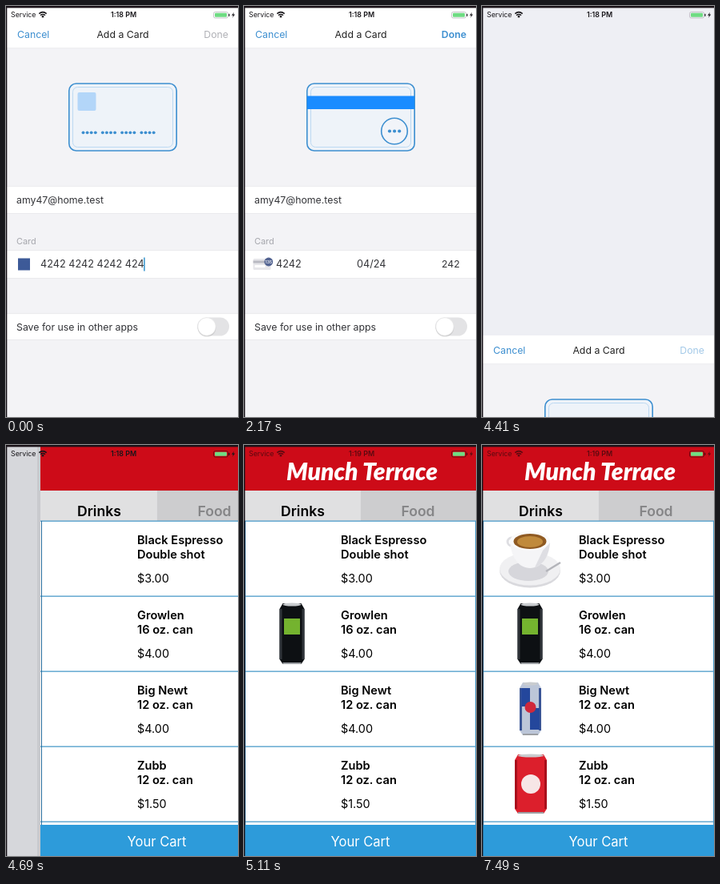
These frames come from a looping animation (290x514 px, 7560 ms). An HTML page:

```html
<!DOCTYPE html>
<html lang="en">
<head>
<meta charset="utf-8">
<title>Card form and menu</title>
<style>
  html, body { margin: 0; width: 100%; height: 100%; overflow: hidden; background: #111; }
  svg { display: block; width: 100vw; height: 100vh; font-family: Inter, "Open Sans", sans-serif; font-size: 12.3px; }
  .bold { font-weight: 600; }
  .digits { font-size: 12.7px; white-space: pre; }
  .title { font: italic 900 30px Lato, cursive; fill: #fff; }
</style>
</head>
<body>
<svg id="stage" viewBox="0 0 290 514" xmlns="http://www.w3.org/2000/svg"></svg>
<script>
const LOOP = 7560, STEP = 70;
const BLUE = '#3d8fd0', INK = '#333438', HINT = '#c7c7cd';
const stage = document.getElementById('stage');

const rect = (x, y, w, h, fill, extra = '') =>
  `<rect x="${x}" y="${y}" width="${w}" height="${h}" fill="${fill}" ${extra}/>`;
const circle = (x, y, r, fill, extra = '') => `<circle cx="${x}" cy="${y}" r="${r}" fill="${fill}" ${extra}/>`;
const ellipse = (x, y, rx, ry, fill) => `<ellipse cx="${x}" cy="${y}" rx="${rx}" ry="${ry}" fill="${fill}"/>`;
const path = (d, fill, extra = '') => `<path d="${d}" fill="${fill}" ${extra}/>`;
const text = (x, y, str, fill = INK, extra = '') => `<text x="${x}" y="${y}" fill="${fill}" ${extra}>${str}</text>`;
const group = (id, body, extra = '') => `<g id="${id}" ${extra}>${body}</g>`;
const repeat = (n, draw) => Array.from({ length: n }, (_, i) => draw(i)).join('');

function cardShell(body) {
  return rect(78.8, 97, 134.4, 84, '#eef3f9', `rx="9" stroke="${BLUE}" stroke-width="1.6"`) +
    rect(83.5, 101.5, 125, 75, 'none', 'rx="6" stroke="#bcd9f2"') + body;
}

const cardFront = cardShell(group('details',
  rect(89.5, 108, 23, 23, '#b3d6f9', 'rx="2"') +
  repeat(16, i => circle(96.5 + Math.floor(i / 4) * 24.3 + (i % 4) * 5.1, 158.3, 1.9, BLUE))));

const cardBack = cardShell(
  rect(79, 112.5, 134, 16.5, '#1a8cff') +
  circle(188, 156.5, 16.3, '#f1f4f9', `stroke="${BLUE}" stroke-width="1.6"`) +
  repeat(3, i => circle(182 + i * 6.1, 156.5, 2.1, BLUE)));

const cvcIcon =
  rect(11.5, 316, 22, 14, '#e6e6ea', 'rx="1.5"') + rect(11.5, 318.5, 22, 3, '#b9bac2') +
  rect(13.5, 324, 13, 3, '#fff') + circle(30.8, 320, 5.4, '#526391') +
  text(30.8, 322, '135', '#fff', 'text-anchor="middle" font-size="5" class="bold"');

const whiteRow = (y, h) =>
  rect(0, y, 290, h, '#fff') + rect(0, y - .5, 290, .6, '#e4e4e8') + rect(0, y + h, 290, .6, '#e4e4e8');

const form = group('form',
  rect(0, 17, 290, 520, '#f3f3f6') +
  rect(0, 17, 290, 35.5, '#fff') + rect(0, 52.5, 290, .6, '#e6e6ea') +
  text(14, 39.8, 'Cancel', BLUE) +
  text(146, 39.8, 'Add a Card', '#222', 'text-anchor="middle"') +
  text(278, 39.8, 'Done', '#b0b1b6', 'id="done" text-anchor="end"') +
  group('front', cardFront) + group('back', cardBack) +
  whiteRow(225.5, 33.5) + text(13, 247, 'amy47@home.test') +
  text(13, 297.5, 'Card', '#a5a6ac', 'font-size="10.9"') +
  whiteRow(306, 34) +
  group('brand', rect(15, 315.5, 15, 15, '#3d5a98')) + group('cvcIcon', cvcIcon) +
  '<g clip-path="url(#field)">' + group('number',
    text(43, 327, '4242 4242 4242 ', INK, 'id="lead" class="digits"') +
    text(0, 327, '4242', INK, 'id="last" class="digits"')) + '</g>' +
  group('extras',
    text(141, 327, '', INK, 'id="expiry" class="digits"') + text(247, 327, '', INK, 'id="cvc"')) +
  rect(0, 314.5, 1.6, 17, '#3f9ad0', 'id="caret"') +
  whiteRow(385, 32) + text(13, 405.8, 'Save for use in other apps') +
  rect(239, 389.5, 40, 23, '#e3e3e5', 'rx="11.5"') +
  circle(251, 402.5, 11.3, '#000', 'opacity=".12"') + circle(251, 401, 11.2, '#fff', 'stroke="#ddd" stroke-width=".5"'));

function can(x, y, w, h, side, body, art) {
  const b = y + h, r = x + w;
  return path(`M${x + 4} ${y}H${r - 4}L${r} ${y + 7}V${b - 6}L${r - 4} ${b}H${x + 4}L${x} ${b - 6}V${y + 7}Z`, body) +
    rect(x, y + 7, 3, h - 13, side) + rect(r - 3, y + 7, 3, h - 13, side) +
    ellipse(x + w / 2, y + 1.5, w / 2 - 4, 2, '#c9cccf') +
    rect(x + 4, b - 2, w - 8, 2, '#9da0a4') + art;
}

const coffee =
  ellipse(60, 157, 38, 21.5, '#d9d9dd') + ellipse(60, 155, 38, 20.5, '#f0f0f2') + ellipse(58, 158, 25, 12, '#d6d6db') +
  path('M80 158L98 147', 'none', 'stroke="#b3b4ba" stroke-width="2.5"') +
  circle(37, 121, 5, 'none', 'stroke="#dedee2" stroke-width="3"') +
  path('M35 120C36 140 46 154 60 154S84 140 85 120Z', '#f5f5f7') +
  path('M66 153C78 149 84 137 85 122L76 132Z', '#dedee3') +
  ellipse(60, 120, 25, 12, '#fafafb') + ellipse(60, 120.5, 20.5, 9.5, '#8f5a22') + ellipse(60, 121, 16, 7, '#c08a3c');

const products = [
  { name: 'Black Espresso', size: 'Double shot', price: '$3.00', at: 5250, art: coffee },
  { name: 'Growlen', size: '16 oz. can', price: '$4.00', at: 4970,
    art: can(44.5, 198, 31, 76, '#30343a', '#0d1013', rect(50, 217, 20, 20, '#74b32f')) },
  { name: 'Big Newt', size: '12 oz. can', price: '$4.00', at: 5390,
    art: can(47, 297, 27, 66, '#3a5596', '#bcc6d8',
      path('M49 304H60V327H49ZM60 329H72V356H60Z', '#24479c') + circle(60.5, 328, 7, '#d0283b')) },
  { name: 'Zubb', size: '12 oz. can', price: '$1.50', at: 5530,
    art: can(41, 387, 40, 74, '#a90f1b', '#dc1f2c', circle(61, 424, 12, '#f7e6e6')) }
];

const store = group('store',
  rect(-4, 0, 4, 514, '#000', 'opacity=".06"') + rect(0, 0, 290, 514, '#fff') +
  rect(0, 0, 290, 57, '#cd0b18') +
  text(147.5, 43.5, 'Munch Terrace', '#fff', 'id="title" class="title" text-anchor="middle"') +
  rect(0, 57, 145.5, 38, '#e0e0e1') + rect(145.5, 57, 144.5, 38, '#cdcdcf') +
  text(73.5, 89, 'Drinks', '#000', 'class="bold" font-size="17.6"  text-anchor="middle"') +
  text(217.5, 89, 'Food', '#858587', 'class="bold" font-size="17.6" text-anchor="middle"') +
  products.map(({ name, size, price, art }, i) => {
    const y = 95 + i * 94;
    return text(121, y + 29, name, '#000', 'class="bold" font-size="14.6"') +
      text(121, y + 47, size, '#000', 'class="bold" font-size="14.6"') +
      text(121, y + 76.5, price, '#000', 'font-size="14.4"') + group('photo' + i, art);
  }).join('') +
  repeat(5, i => rect(0, 94.5 + i * 94, 290, 1.3, '#4c9cca')) +
  rect(1, 95, 1, 380, '#2a6f9e') + rect(289, 95, 1, 380, '#4c9cca') +
  rect(0, 475, 290, 39, '#2d9bda') +
  text(145.5, 501.8, 'Your Cart', '#fff', 'font-size="16.6" text-anchor="middle"'));

const statusBar = group('status',
  text(6, 14.2, 'Service', 'currentColor', 'font-size="8.8"') +
  path('M41.3 9.6Q46 5.6 50.7 9.6M43 11.7Q46 9.2 49 11.7', 'none', 'stroke="currentColor" stroke-width="1.5"') +
  circle(46, 13.3, 1.3, 'currentColor') +
  text(147, 14.2, '', 'currentColor', 'id="clock" class="bold" font-size="8.9" text-anchor="middle"') +
  rect(259.5, 7.5, 18, 7.5, 'none', 'id="shell" rx="2" stroke-width=".8"') +
  rect(261, 8.8, 15, 5, '#6fdc83', 'rx="1"') + rect(278.3, 9.8, 1.2, 3, 'currentColor') +
  path('M285 7.8L282 11.8H284L283 14.8L286.2 10.5H284.2Z', 'currentColor'));

stage.innerHTML =
  '<defs><clipPath id="field"><rect x="37" y="306" width="253" height="34"/></clipPath></defs>' +
  rect(0, 0, 290, 514, '#eeeff4') + rect(0, 0, 290, 18, '#fff', 'id="statusFill"') +
  form + rect(0, 0, 290, 514, '#000', 'id="dim"') +
  group('storeShift', store) + statusBar +
  rect(0, 0, 290, 2.4, '#1a1218') + rect(0, 0, 1.3, 514, '#141016');

const $ = Object.fromEntries([...stage.querySelectorAll('[id]')].map(el => [el.id, el]));
const set = (el, attrs) => { for (const key in attrs) el.setAttribute(key, attrs[key]); };
const show = (el, on) => set(el, { display: on ? 'inline' : 'none' });
const ramp = (t, from, to) => Math.min(1, Math.max(0, (t - from) / (to - from)));
const ease = p => p * p * (3 - 2 * p);
const spring = (t, from, rate) => {
  const x = Math.max(0, t - from) * rate;
  return 1 - (1 + x) * Math.exp(-x);
};

// Value of the last [time, value] pair that has been reached.
const latest = (t, steps) => steps.reduce((value, [at, next]) => t >= at ? next : value, null);

const lastX = 43 + $.lead.getComputedTextLength();

function setField(el, value, hint) {
  el.textContent = value || hint;
  set(el, { fill: value ? INK : HINT });
}

function drawNumber(t) {
  const slide = ease(ramp(t, 70, 350));
  $.last.textContent = t < 70 ? '424' : '4242';
  set($.lead, { opacity: 1 - slide });
  set($.last, { x: lastX });
  set($.number, { transform: `translate(${(40 - lastX) * slide} 0)` });
  set($.extras, { transform: `translate(${120 * (1 - slide)} 0)`, opacity: slide });
}

function drawCaret(t, expiry, cvc) {
  const x = t < 140 ? lastX + $.last.textContent.length * 7.8
    : t < 490 ? 141 + expiry.length * 7.3
    : 246 + cvc.length * 8;
  const blinks = [[1890, 2030, 0], [2380, 2520, 1], [2940, 3080, 0], [3430, 3570, 1]];
  let alpha = 1;
  for (const [from, to, goal] of blinks) {
    const p = ramp(t, from - STEP, to);
    if (p > 0) alpha = goal ? p : 1 - p;
  }
  set($.caret, { x, opacity: t >= 3780 ? 0 : alpha });
}

function drawCard(t) {
  const angle = ease(ramp(t, 420, 700)) - ease(ramp(t, 3780, 4130));
  const width = Math.cos(angle * Math.PI);
  for (const [el, on] of [[$.front, width >= 0], [$.back, width < 0]]) {
    show(el, on);
    set(el, { transform: `translate(146 0) scale(${Math.abs(width)} 1) translate(-146 0)` });
  }
  show($.details, t < 3780);
}

function drawForm(t) {
  const expiry = latest(t, [[0, ''], [210, '0'], [280, '04/'], [350, '04/2'], [420, '04/24']]);
  const cvc = latest(t, [[0, ''], [1260, '2'], [1330, '24'], [1400, '242']]);
  drawNumber(t);
  setField($.expiry, expiry, 'MM/YY');
  setField($.cvc, cvc, 'CVC');
  drawCaret(t, expiry, cvc);
  drawCard(t);
  const toCvc = ramp(t, 420, 630);
  set($.brand, { opacity: 1 - toCvc });
  set($.cvcIcon, { opacity: toCvc });
  const ready = t >= 1400 && t < 3500;
  set($.done, { fill: t < 1400 ? '#b0b1b6' : ready ? BLUE : '#a3c9e8', 'font-weight': ready ? 600 : 400 });
  set($.form, { transform: `translate(0 ${Math.round(514 * spring(t, 4200, .0133))})` });
  show($.form, t < 4690);
  show($.statusFill, t < 4200);
}

function drawStore(t) {
  const pushed = spring(t, 4480, .0161);
  set($.storeShift, { transform: `translate(${Math.round(290 * (1 - pushed))} 0)` });
  show($.storeShift, t > 4480);
  set($.dim, { opacity: .12 * pushed });
  show($.title, t >= 4830);
  products.forEach(({ at }, i) => show($['photo' + i], t >= at));
}

function drawStatus(t) {
  $.status.style.color = t >= 4760 ? '#5b0a10' : '#18161a';
  set($.shell, { stroke: t >= 4620 ? '#5b0a10' : '#b9b7bd' });
  $.clock.textContent = t < 4900 ? '1:18 PM' : '1:19 PM';
}

function render(t) {
  drawForm(t);
  drawStore(t);
  drawStatus(t);
}

const start = performance.now();
function tick(now) {
  const elapsed = Math.max(0, now - start) % LOOP;
  render(Math.floor(elapsed / STEP) * STEP);
  requestAnimationFrame(tick);
}
render(0);
requestAnimationFrame(tick);
</script>
</body>
</html>
```
